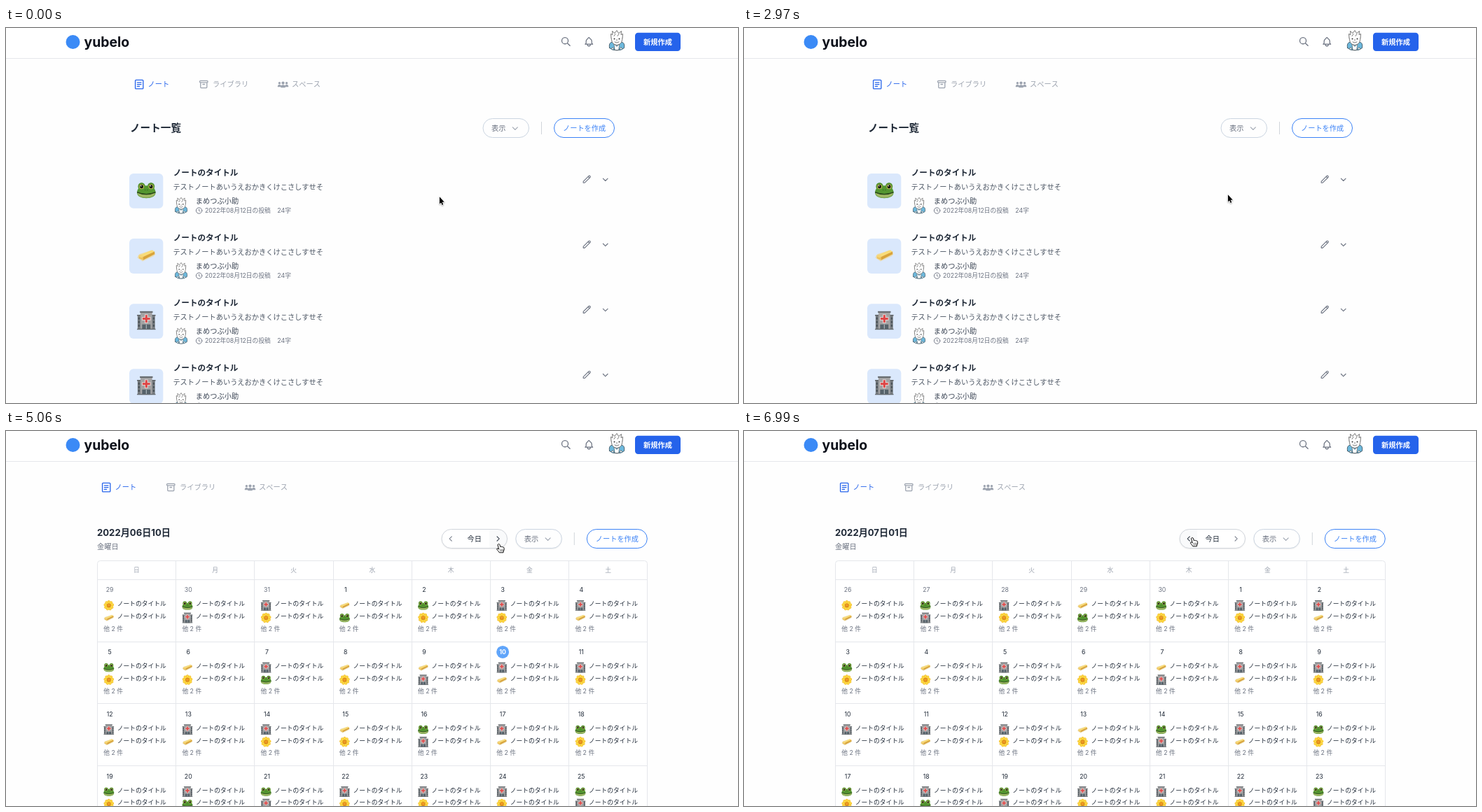
These frames come from a looping animation (1045 by 536 pixels, 8 s). An HTML page with a canvas:

```html
<!DOCTYPE html>
<html lang="ja">
<head>
<meta charset="utf-8">
<title>ノート一覧</title>
<style>
html, body { margin: 0; width: 100%; height: 100%; overflow: hidden; background: #fefefe; }
canvas { display: block; width: 1045px; height: 536px; }
</style>
</head>
<body>
<canvas id="stage"></canvas>
<script>
const W = 1045, H = 536, LOOP = 8000;
const FONT = 'Inter, "Noto Sans CJK JP", "Noto Sans CJK", sans-serif';
const BLUE = '#3b82f6', INK = '#1f2937', GRAY = '#6b7280', PALE = '#9ca3af', LINE = '#e5e7eb';
const S = 8.76, M = 10.22, L = 11.6;

const canvas = document.getElementById('stage');
const ctx = canvas.getContext('2d');
const dpr = window.devicePixelRatio || 1;
canvas.width = W * dpr;
canvas.height = H * dpr;

const ICON = {
  search: 'M21 21l-6-6m2-5a7 7 0 11-14 0 7 7 0 0114 0z',
  bell: 'M15 17h5l-1.4-1.4A2 2 0 0118 14.2V11a6 6 0 00-4-5.7V5a2 2 0 10-4 0v.3C7.7 6.2 6 8.4 6 11v3.2c0 .5-.2 1-.6 1.4L4 17h5m6 0v1a3 3 0 11-6 0v-1m6 0H9',
  down: 'M19 9l-7 7-7-7',
  left: 'M15 19l-7-7 7-7',
  right: 'M9 5l7 7-7 7',
  clock: 'M12 8v4l3 3m6-3a9 9 0 11-18 0 9 9 0 0118 0z',
  pencil: 'M15.2 5.2l3.6 3.6m-2.1-5.1a2.5 2.5 0 113.6 3.6L6.5 21H3v-3.5L16.7 3.7z',
  archive: 'M5 8h14M5 8a2 2 0 110-4h14a2 2 0 110 4M5 8v10a2 2 0 002 2h10a2 2 0 002-2V8m-9 4h4',
  note: 'M4.5 2h15a1.5 1.5 0 011.5 1.5v17a1.5 1.5 0 01-1.5 1.5h-15a1.5 1.5 0 01-1.5-1.5v-17A1.5 1.5 0 014.5 2zM7.5 7.5h9M7.5 12h9M7.5 16.5h5'
};

function icon(name, x, y, size, color, weight = 2) {
  const k = size / 24;
  ctx.save();
  ctx.translate(x - size / 2, y - size / 2);
  ctx.scale(k, k);
  ctx.lineWidth = weight;
  ctx.lineCap = ctx.lineJoin = 'round';
  ctx.strokeStyle = color;
  ctx.stroke(new Path2D(ICON[name]));
  ctx.restore();
}

// y is the vertical middle of the line
function text(str, x, y, size, color, weight = 400, align = 'left') {
  ctx.font = `${weight} ${size}px ${FONT}`;
  ctx.textAlign = align;
  ctx.fillStyle = color;
  ctx.fillText(str, x, y + size * 0.37);
}

function box(x, y, w, h, r, fill, stroke) {
  ctx.beginPath();
  ctx.roundRect(x, y, w, h, r);
  if (fill) { ctx.fillStyle = fill; ctx.fill(); }
  if (stroke) { ctx.strokeStyle = stroke; ctx.lineWidth = 1; ctx.stroke(); }
}

function shadowBox(x, y, w, h, r, fill, blur, dy, alpha) {
  ctx.save();
  ctx.shadowColor = `rgba(0,0,0,${alpha})`;
  ctx.shadowBlur = blur * dpr;
  ctx.shadowOffsetY = dy * dpr;
  box(x, y, w, h, r, fill);
  ctx.restore();
}

function oval(x, y, rx, ry, fill) {
  ctx.beginPath();
  ctx.ellipse(x, y, rx, ry, 0, 0, Math.PI * 2);
  ctx.fillStyle = fill;
  ctx.fill();
}

function shape(d, fill, stroke, weight = 1) {
  const p = new Path2D(d);
  if (fill) { ctx.fillStyle = fill; ctx.fill(p); }
  if (stroke) {
    ctx.strokeStyle = stroke;
    ctx.lineWidth = weight;
    ctx.lineJoin = ctx.lineCap = 'round';
    ctx.stroke(p);
  }
}

function rule(x, y, w, h, color = LINE) {
  ctx.fillStyle = color;
  ctx.fillRect(x, y, w, h);
}

// Pictures are drawn in a 100 unit square around the middle
const PICTURE = {
  f() {
    for (const s of [-1, 1]) oval(s * 25, -20, 19, 20, '#4f8f2c');
    shape('M-49 14C-50 -10 -30 -24 0 -24S50 -10 49 14C48 34 28 42 0 42S-48 34 -49 14Z', '#549631');
    shape('M-46 14Q0 34 46 14C46 32 26 40 0 40S-46 32 -46 14Z', '#9fb765');
    shape('M-47 11Q0 32 47 11', null, '#26401a', 5);
    for (const s of [-1, 1]) {
      oval(s * 25, -19, 13, 13, '#c9c25a');
      oval(s * 25, -19, 9, 10, '#161c12');
      oval(s * 25 - 3, -23, 3, 3, '#fff');
      oval(s * 6, -1, 2.5, 2, '#26501a');
    }
  },
  b() {
    shape('M-48 12L-38 -6L34 -28L48 -6L40 4L-20 32Z', '#e9dcb4');
    shape('M-38 0L28 -27L44 -20L-16 8Z', '#f9dc78');
    shape('M-38 0L-16 8L-17 25L-39 16Z', '#eec25a');
    shape('M-16 8L44 -20L44 -6L-17 25Z', '#d9a43a');
    shape('M-44 4L-30 -4L-12 4L-26 13Z', '#f6d677');
  },
  h() {
    rule(-46, -28, 92, 76, '#777c80');
    rule(-31, -46, 62, 94, '#a3a3a4');
    rule(-34, -49, 68, 8, '#666b6f');
    rule(-49, -30, 18, 6, '#5e6367');
    rule(31, -30, 18, 6, '#5e6367');
    for (const [w, h, color] of [[17, 46, '#efe4e2'], [46, 17, '#efe4e2'], [11, 40, '#dd4545'], [40, 11, '#dd4545']]) {
      rule(-w / 2, -9 - h / 2, w, h, color);
    }
    for (const s of [-1, 1]) for (const y of [-16, 3, 22]) rule(s * 39 - 4, y, 8, 11, '#4a5258');
    rule(-22, 21, 44, 27, '#56626a');
    rule(-2, 21, 4, 27, '#b4bec4');
    rule(-49, 44, 98, 5, '#666b6f');
  },
  s() {
    for (let i = 0; i < 9; i++) {
      ctx.save();
      ctx.rotate(i * Math.PI * 2 / 9);
      oval(0, -31, 14, 18, '#f1b824');
      oval(0, -31, 11, 15, '#fcd843');
      ctx.restore();
    }
    oval(0, 0, 19, 19, '#cf7c16');
    oval(0, -1, 15, 14, '#ee9a24');
  }
};

function picture(kind, x, y, size) {
  ctx.save();
  ctx.translate(x, y);
  ctx.scale(size / 100, size / 100);
  PICTURE[kind]();
  ctx.restore();
}

function avatar(x, y, k) {
  ctx.save();
  ctx.translate(x, y);
  ctx.scale(k, k);
  shape('M-10.5 11Q-12 3 -6 2.5L6 2.5Q12 3 10.5 11Q7 14.5 0 14.5T-10.5 11Z', '#6db9dd', '#3f5563', .9);
  shape('M-4 5L0 9L4 5L2.5 14L-2.5 14Z', '#fff', '#555', .6);
  shape('M-8 12Q-5 8 -4 13M8 12Q5 8 4 13', '#fff', '#444', .8);
  shape('M-7.5 -7Q-9.5 6 0 7Q9.5 6 7.5 -7Q0 -11 -7.5 -7Z', '#fff', '#555', .8);
  shape('M-8 -3L-8.5 -9L-6 -8L-6.5 -13L-3 -10L0 -14L2.5 -10L6.5 -13L6 -8L8.5 -9L8 -3', '#fff', '#555', .8);
  shape('M-4 -6L-2 -9M1 -6L3 -9M-3 2.5Q0 5 3 2.5M0 -1L0 .5', null, '#555', .8);
  oval(-3.5, -2, 1, 1, '#333');
  oval(3.5, -2, 1, 1, '#333');
  ctx.restore();
}

function header() {
  rule(0, 0, W, 43, '#fff');
  rule(0, 43, W, 1);
  oval(95.5, 20, 10, 10, '#3b8af6');
  text('yubelo', 111.5, 20, 19.4, '#0b0f19', 700);
  icon('search', 799.3, 19.5, 15.5, GRAY);
  icon('bell', 832.2, 19.8, 16.2, GRAY, 1.8);
  avatar(872, 17.5, 1);
  box(898, 6.7, 65, 26.3, 4.4, '#2563eb');
  text('新規作成', 930.5, 20, M, '#fff', 700, 'center');
}

function person(x, y, r) {
  oval(x, y, r, r, PALE);
  box(x - r * 1.5, y + r * 1.3, r * 3, r * 1.9, [r * 1.3, r * 1.3, 0, 0], PALE);
}

function tabs(dx) {
  ctx.save();
  ctx.translate(dx, 0);
  icon('note', 190.2, 80.6, 15, '#2563eb', 2.1);
  text('ノート', 202.5, 80.2, M, '#2563eb');
  icon('archive', 282.3, 80.5, 15.5, PALE);
  text('ライブラリ', 295, 80.2, M, PALE);
  person(390.4, 78.8, 1.7);
  person(400.6, 78.8, 1.7);
  person(395.5, 78.6, 2.1);
  text('スペース', 408, 80.2, M, PALE);
  ctx.restore();
}

// Pills on the right; y is their middle
function actions(dx, y, hover, raised) {
  ctx.save();
  ctx.translate(dx, y);
  const bg = hover ? '#f9fafb' : '#fefefe';
  if (hover) shadowBox(681, -13.5, 65.5, 27, 13.5, bg, 5, 2, .12);
  else if (raised) shadowBox(681, -13.5, 65.5, 27, 13.5, bg, 2, 1, .1);
  box(681, -13.5, 65.5, 27, 13.5, bg, '#cbd5e1');
  text('表示', 693, 0, M, GRAY);
  icon('down', 726.8, .4, 12, PALE, 2.2);
  rule(764, -9, 1, 18, '#d1d5db');
  box(782.5, -13.5, 86, 27, 13.5, '#fff', BLUE);
  text('ノートを作成', 825.6, 0, M, BLUE, 400, 'center');
  ctx.restore();
}

function noteRow(i) {
  ctx.save();
  ctx.translate(0, i * 93.1);
  box(176, 208, 48.3, 49.8, 6, '#dae8fc');
  picture('fbhh'[i], 200.3, 231.8, 27);
  text('ノートのタイトル', 238.7, 206.6, L, INK, 700);
  text('テストノートあいうえおかきくけこさしすせそ', 238.4, 227, M, '#4b5563');
  avatar(250, 253.5, .8);
  text('まめつぶ小助', 270.8, 247.4, M, '#374151');
  icon('clock', 275.6, 261, 11.2, GRAY);
  text('2022年08月12日の投稿', 284, 261, S, GRAY);
  text('24字', 387.3, 261, S, GRAY);
  icon('pencil', 829.2, 216.2, 13.4, GRAY);
  icon('down', 855.7, 216.6, 11.4, GRAY, 2.4);
  ctx.restore();
}

function menu() {
  shadowBox(641.5, 163, 104.5, 96.5, 4, '#fff', 6, 3.5, .14);
  ['リスト', '日', '月'].forEach((s, i) => text(s, 652.7, 178.7 + i * 32.3, M, i ? GRAY : BLUE));
}

function listView(pos, open) {
  tabs(0);
  text('ノート一覧', 177, 142.8, 14.6, INK, 700);
  const overPill = inside(pos, 681, 129, 66, 28);
  actions(0, 143, overPill);
  for (let i = 0; i < 4; i++) noteRow(i);
  if (open) menu();
  return overPill || (open && inside(pos, 641, 163, 106, 97));
}

function pager(pos) {
  const over = inside(pos, 622, 140, 94, 28);
  const zone = !over ? '' : pos.x < 647 ? 'left' : pos.x > 690 ? 'right' : 'mid';
  shadowBox(622, 140.5, 93.5, 27, 13.5, '#fff', 2, 1, .1);
  box(622, 140.5, 93.5, 27, 13.5, '#fff');
  if (zone === 'left') box(622, 140.5, 25, 27, [13.5, 0, 0, 13.5], '#f9fafb');
  if (zone === 'right') box(690, 140.5, 25.5, 27, [0, 13.5, 13.5, 0], '#f9fafb');
  box(622, 140.5, 93.5, 27, 13.5, null, '#d1d5db');
  icon('left', 634.9, 154, 11, zone === 'left' ? INK : GRAY, 2.2);
  icon('right', 702.4, 154, 11, zone === 'right' ? INK : GRAY, 2.2);
  text('今日', 668.8, 154, M, INK, 400, 'center');
  return over;
}

const CELLS = [
  'sb fh hs bf fs hs hb', 'fs bs hf bs bh hb hs',
  'hb hb hs bs fh hb fs', 'fs hf fh hs hs hs fh'
].map(r => r.split(' '));
const COL = 112.2, ROW = 88.7;

function cell(r, c, month, firstDay, filled) {
  const date = new Date(2022, month - 2, firstDay + r * 7 + c);
  const today = month === 6 && date.getMonth() === 5 && date.getDate() === 10;
  const other = date.getMonth() !== month - 1;
  ctx.save();
  ctx.translate(c * COL, r * ROW);
  if (today) oval(148.1, 227.2, 9, 9, '#60a5fa');
  text(date.getDate(), 148.1, 227.2, S, today ? '#fff' : other ? GRAY : INK, today ? 700 : 400, 'center');
  if (filled) {
    [...CELLS[r][c]].forEach((kind, i) => {
      picture(kind, 146.8, 249.3 + i * 17.7, 15);
      text('ノートのタイトル', 158.8, 247.2 + i * 17.7, S, INK);
    });
    text('他 2 件', 139.2, 282.8, S, GRAY);
  }
  ctx.restore();
}

function calendarView(pos, month, firstDay, title, filled) {
  tabs(-47);
  text(title, 130, 145, 13.14, INK, 700);
  text('金曜日', 130, 165.6, M, GRAY);
  const overPill = inside(pos, 728, 140, 66, 28);
  const overPager = pager(pos);
  actions(46.8, 154, overPill, true);

  box(130.5, 185.5, 785, 400, 4, '#fff', LINE);
  for (let r = 0; r < 4; r++) rule(130, Math.round(211.8 + r * ROW), 786, 1);
  for (let c = 0; c < 7; c++) {
    if (c) rule(Math.round(130 + c * COL), 186, 1, 350);
    text('日月火水木金土'[c], 186.3 + c * COL, 198.6, S, PALE, 400, 'center');
    for (let r = 0; r < 4; r++) cell(r, c, month, firstDay, filled);
  }
  return overPill || overPager;
}

function inside(p, x, y, w, h) {
  return p.x >= x && p.x <= x + w && p.y >= y && p.y <= y + h;
}

// Pointer moves: first and last step time, step count, end point, bend point
const START = { x: 618.5, y: 241 };
const MOVES = [
  { t0: 600, t1: 1340, n: 6, x: 722.5, y: 150 },
  { t0: 2080, t1: 2520, n: 4, x: 690.5, y: 238 },
  { t0: 4460, t1: 5060, n: 5, x: 703.5, y: 161, bend: { x: 775, y: 185 } },
  { t0: 6550, t1: 6990, n: 4, x: 640, y: 152 }
];
const ease = p => p * p * (3 - 2 * p);

function pointer(t) {
  let from = START;
  for (const m of MOVES) {
    if (t < m.t0) break;
    if (t >= m.t1) { from = m; continue; }
    const step = Math.floor((t - m.t0) / (m.t1 - m.t0) * (m.n - 1) + 1e-6) + 1;
    const p = ease(step / m.n), q = 1 - p;
    const b = m.bend || { x: (from.x + m.x) / 2, y: (from.y + m.y) / 2 };
    const at = k => q * q * from[k] + 2 * p * q * b[k] + p * p * m[k];
    return { x: at('x'), y: at('y') };
  }
  return { x: from.x, y: from.y };
}

function drawPointer(pos, hand) {
  ctx.save();
  ctx.translate(pos.x, pos.y);
  if (hand) {
    shape('M-1.4 1.2Q0 -.4 1.3 1.2L2.2 4.6Q3.4 3.6 4.3 4.7Q5.4 4 6.1 5.2Q7.4 4.8 7.6 6.3Q8.2 9.4 6.6 11L6.5 12.8L.8 12.8Q-.4 10.8 -2.6 8.4Q-3.2 6.8 -1.5 6.9L-.1 7.8Z', '#fff', '#111', 1);
    shape('M2 8.3L2.3 11M4 8.1L4.2 10.9M5.8 8L5.9 10.7', null, '#111', .6);
  } else {
    const d = 'M.4 .2L.4 10.4L2.6 8.4L4.1 12L5.7 11.3L4.2 7.8L7.2 7.8Z';
    ctx.shadowColor = 'rgba(0,0,0,.25)';
    ctx.shadowBlur = 2 * dpr;
    ctx.shadowOffsetY = dpr;
    shape(d, '#fff', '#fff', 1.6);
    ctx.shadowColor = 'transparent';
    shape(d, '#000');
  }
  ctx.restore();
}

function draw(t) {
  ctx.setTransform(dpr, 0, 0, dpr, 0, 0);
  rule(0, 0, W, H, '#fefefe');
  const pos = pointer(t);
  header();
  let hand;
  if (t < 3120) hand = listView(pos, t >= 1790 && t < 2970);
  else if (t < 5510) hand = calendarView(pos, 6, 29, '2022月06日10日', t >= 3720);
  else hand = calendarView(pos, 7, 26, '2022月07日01日', t >= 6100);
  drawPointer(pos, hand);
}

const begin = performance.now();
function frame() {
  draw((performance.now() - begin) % LOOP);
  requestAnimationFrame(frame);
}
frame();
</script>
</body>
</html>
```
